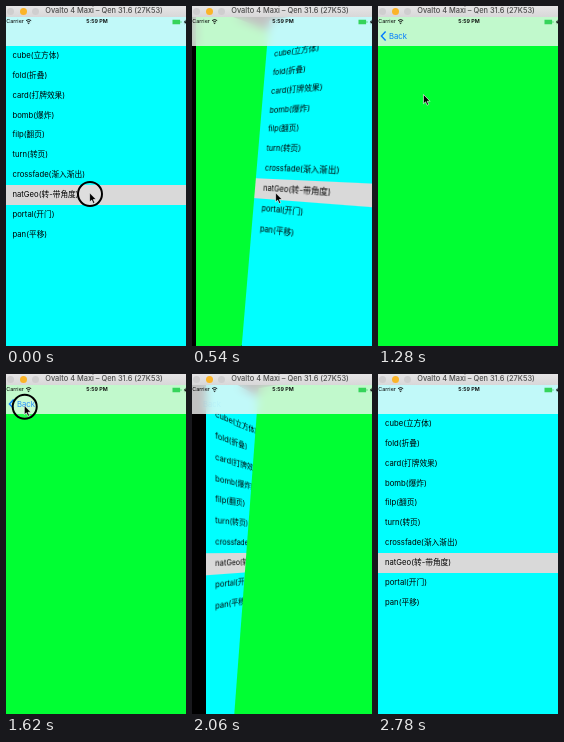
An HTML page that plays this animation: 180 px wide and 340 px high, repeating every 2800 ms.

```html
<!DOCTYPE html>
<html lang="en">
<head>
<meta charset="utf-8">
<style>
  html, body { margin: 0; width: 100%; height: 100%; overflow: hidden; background: #000; }
  body { position: relative; font: 7.7px Inter, "Noto Sans CJK SC", "Noto Sans CJK", sans-serif; color: #000; }
  body > *, .plane, .bar > * { position: absolute; white-space: nowrap; }
  #phone { left: -2.5px; top: 11px; width: 187px; height: 332px; perspective: 226px; }
  #space { width: 100%; height: 100%; transform-style: preserve-3d; }
  .plane { inset: 0; overflow: hidden; }
  #list { background: #0ff; padding-top: 29px; }
  #list.blank { background: #fff; }
  #list.blank p { visibility: hidden; }
  #list p { margin: 0; padding-left: 9px; height: 19.87px; line-height: 19.87px; }
  #list p.on { background: #d9d9d9; }
  #page { background: #00ff33; }
  #nav { left: 0; top: 11px; width: 180px; height: 29px; background: rgba(248,248,248,.78); backdrop-filter: blur(5px); }
  #title { left: 0; top: 0; width: 180px; height: 11px; background: linear-gradient(#e6e5e6, #d8d7d8); }
  #title i { top: 1.6px; width: 7px; height: 7px; border-radius: 50%; background: #cfcecf; }
  #title b { left: 0; width: 196px; text-align: center; font-weight: 500; font-size: 7.4px; line-height: 10.5px; color: #4a4a4a; }
  #status { left: 0; top: 11px; width: 180px; height: 9px; font-size: 5.4px; line-height: 9.5px; }
  svg { left: 0; top: 0; overflow: visible; }
</style>
</head>
<body>
<div id="phone"><div id="space">
  <div class="plane" id="page"></div>
  <div class="plane" id="list"></div>
</div></div>
<div id="nav"></div>
<div class="bar" id="status">
  <span style="left:.2px">Carrier</span>
  <b style="left:0;width:182px;text-align:center;font-weight:600">5:59 PM</b>
</div>
<div class="bar" id="title">
  <i style="left:.5px"></i><i style="left:13.5px;background:#fbb429"></i><i style="left:26px"></i>
  <b>Ovalto 4 Maxi – Qen 31.6 (27K53)</b>
</div>
<svg width="180" height="340">
  <g fill="none" stroke="#000" stroke-width=".9">
    <path d="M20 14.6q2.6-2.2 5.2 0M21.1 16q1.5-1.3 3 0"/>
    <circle cx="22.6" cy="17.3" r=".35"/>
  </g>
  <path d="M166.5 13.8h7.6v4.4h-7.6zM174.6 15.2h.8v1.6h-.8z" fill="#35d45a"/>
  <path d="M179.6 13.4l-1.8 3h1.3l-.4 2.2 1.9-3h-1.3z" fill="#000"/>
  <path id="chevron" d="M7.6 25.6L3.4 30l4.2 4.4" fill="none" stroke="#007aff" stroke-width="1.4"/>
  <text id="back" x="11" y="32.8" font-size="7.7" fill="#007aff">Back</text>
  <g id="cursor">
    <circle id="press" r="12" fill="rgba(255,255,255,.15)" stroke="#000" stroke-width="2"/>
    <path d="M-.4-1.2v9.2l2.1-1.9 1.5 3.4 1.6-.7-1.5-3.3h2.9z" fill="#000" stroke="#fff" stroke-width=".6"/>
  </g>
</svg>
<script>
  const $ = id => document.getElementById(id);
  const list = $('list'), page = $('page');
  const LOOP = 2800;
  // Each transition swings one view out while the other unfolds a little faster.
  const PUSH = { start: 183, swing: 800, fold: 620 }, POP = { start: 1678, swing: 930, fold: 780 };
  const names = ['cube(立方体)', 'fold(折叠)', 'card(打牌效果)', 'bomb(爆炸)', 'filp(翻页)', 'turn(转页)',
    'crossfade(渐入渐出)', 'natGeo(转-带角度)', 'portal(开门)', 'pan(平移)'];
  list.innerHTML = names.map((n, i) => `<p${i === 7 ? ' class="on"' : ''}>${n}</p>`).join('');

  // time, x, y
  const path = [[0, 84, 188], [1100, 84, 188], [1280, 46, 90], [1480, 20, 34], [1700, 18, 32],
    [1840, 31, 37], [2080, -12, 48], [LOOP, -12, 48]];

  const clamp = v => Math.min(1, Math.max(0, v));
  const phase = (t, start, length) => clamp((t - start) / length);
  const ease = x => (1 - Math.cos(Math.PI * x)) / 2;

  const swing = p => `translate3d(${145.5 * p}px,${-5.4 * p}px,${67.7 * p}px) rotate3d(.245,-.952,.185,${46.7 * p}deg)`;
  const fold = s => `translateZ(${-77.9 * s}px) rotateY(${80 * s}deg)`;

  function pose(upper, lower, t, move) {
    const p = ease(phase(t, move.start, move.swing));
    upper.style.transform = swing(p);
    lower.style.transform = fold(1 - ease(phase(t, move.start, move.fold)));
    upper.style.visibility = p < 1 ? 'visible' : 'hidden';
    lower.style.visibility = p > 0 ? 'visible' : 'hidden';
  }

  function moveCursor(t) {
    const i = path.findIndex(k => k[0] > t), [t0, x0, y0] = path[i - 1], [t1, x1, y1] = path[i];
    const u = (t - t0) / (t1 - t0);
    $('cursor').setAttribute('transform', `translate(${x0 + (x1 - x0) * u},${y0 + (y1 - y0) * u})`);
    $('press').style.display = t < 120 || (t > 1560 && t < 1680) ? '' : 'none';
  }

  function draw() {
    const t = performance.now() % LOOP;
    if (t < POP.start) pose(list, page, t, PUSH);
    else pose(page, list, t, POP);
    list.className = 'plane' + (t > 640 && t < POP.start ? ' blank' : '');
    const shown = clamp((phase(t, PUSH.start, PUSH.swing) - .62) / .38);
    const leaving = phase(t, POP.start, POP.swing);
    $('back').style.opacity = shown * clamp(1 - leaving * 2.3);
    $('chevron').style.opacity = shown * clamp(1 - leaving * 4.4);
    moveCursor(t);
    requestAnimationFrame(draw);
  }
  draw();
</script>
</body>
</html>
```
